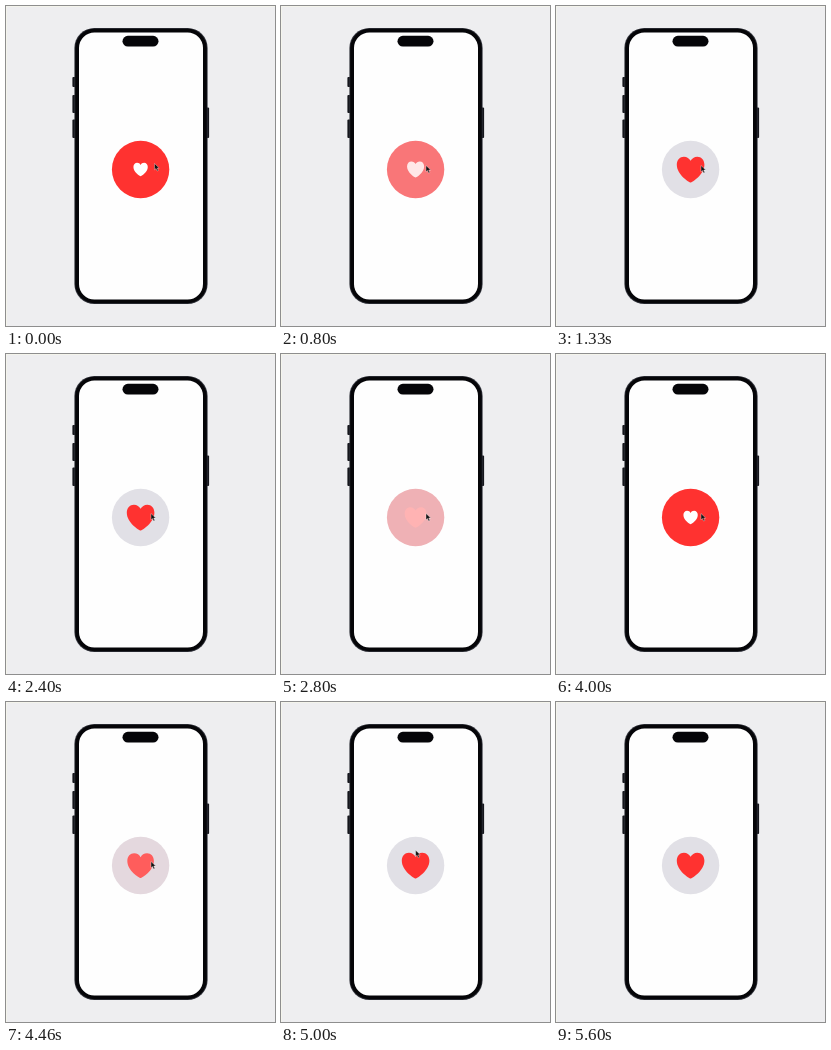
These frames come from a looping animation (269x320 px, 5.93 s). An HTML page:

```html
<!DOCTYPE html>
<html lang="en">
<head>
<meta charset="utf-8">
<title>Like button</title>
<style>
  html, body { margin: 0; width: 100%; height: 100%; overflow: hidden; background: #eeeef0; }
  svg { display: block; width: 269px; height: 320px; }
</style>
</head>
<body>
<svg viewBox="0 0 269 320">
  <rect width="269" height="320" fill="#eeeef0"/>
  <path d="M.5 320V.5H269" fill="none" stroke="#f4f4ec"/>
  <g fill="#15161c">
    <rect x="66.4" y="71" width="4" height="10" rx="1"/>
    <rect x="66.4" y="89" width="4" height="18" rx="1"/>
    <rect x="66.4" y="113.5" width="4" height="18.5" rx="1"/>
    <rect x="199.5" y="101.500" width="3.6" height="30.5" rx="1"/>
  </g>
  <rect x="68.400" y="22" width="133.2" height="276" rx="20" fill="#30323a"/>
  <rect x="69.2" y="22.8" width="131.6" height="274.4" rx="19.300" fill="#050508"/>
  <rect x="73" y="26.5" width="124" height="267" rx="15.5" fill="#fefefe"/>
  <rect x="116.5" y="29.8" width="36" height="10.8" rx="5.4" fill="#050508"/>
  <circle id="disc" cx="134.6" cy="163.500" r="28.7"/>
  <path id="heart" d="M0 13C-1.200 13 -13.8 5.200 -13.8 -4.800C-13.8 -9.600 -10.700 -12.800 -6.700 -12.800C-3.600 -12.800 -1.300 -11.100 0 -8.700C1.300 -11.100 3.600 -12.800 6.700 -12.800C10.700 -12.800 13.800 -9.600 13.800 -4.800C13.800 5.200 1.200 13 0 13Z"/>
  <path id="cursor" d="M0 0V6.300L1.500 5L2.600 7.500L3.800 7L2.700 4.600H4.700Z" fill="#111" stroke="#fff" stroke-opacity=".7" stroke-width=".5"/>
</svg>
<script>
const LOOP = 5930, FADE = 350;
const RED = [255, 50, 48], GREY = [225, 224, 230], WHITE = [255, 255, 255];
// [start, liked]
const toggles = [[690, 1], [2640, 0], [4180, 1]];
// [time, x, y] of the pointer tip
const route = [
  [0, 148.5, 157.5], [130, 148.5, 157.5], [530, 145, 159.5], [4540, 145, 159.5],
  [5130, 128, 141], [5580, 48, -9], [LOOP, 48, -9]
];
const [disc, heart, cursor] = ['disc', 'heart', 'cursor'].map(id => document.getElementById(id));

const clamp = v => Math.min(1, Math.max(0, v));
const smooth = v => v * v * (3 - 2 * v);

// cubic-bezier(.42, 0, .58, 1)
function ease(x) {
  let lo = 0, hi = 1, u = x;
  for (let i = 0; i < 20; i++) {
    u = (lo + hi) / 2;
    const bx = 1.26 * u * (1 - u) ** 2 + 1.74 * u * u * (1 - u) + u ** 3;
    if (bx < x) lo = u; else hi = u;
  }
  return smooth(u);
}

// Colours blend in linear light
const toLinear = c => (c /= 255) <= .04045 ? c / 12.92 : ((c + .055) / 1.055) ** 2.4;
const toSrgb = v => 255 * (v <= .0031308 ? v * 12.92 : 1.055 * v ** (1 / 2.4) - .055);
function mix(a, b, p) {
  const rgb = a.map((c, i) => Math.round(toSrgb(toLinear(c) * (1 - p) + toLinear(b[i]) * p)));
  return `rgb(${rgb})`;
}

function likedAt(t) {
  let p = 0;
  for (const [start, goal] of toggles) p += (goal - p) * ease(clamp((t - start) / FADE));
  return p;
}

function pointerAt(t) {
  const i = route.findIndex(k => k[0] > t);
  const [t0, x0, y0] = route[i - 1], [t1, x1, y1] = route[i];
  const raw = (t - t0) / (t1 - t0);
  const p = t0 === 4540 ? raw * raw : t0 === 5130 ? raw : smooth(raw);
  return [x0 + (x1 - x0) * p, y0 + (y1 - y0) * p];
}

function draw(t) {
  const p = likedAt(t);
  disc.setAttribute('fill', mix(RED, GREY, p));
  heart.setAttribute('fill', mix(WHITE, RED, p));
  heart.setAttribute('transform', `translate(134.6 163.5) scale(${.52 + .48 * p})`);
  cursor.setAttribute('transform', `translate(${pointerAt(t)})`);
}

const begin = performance.now();
function tick() {
  draw((performance.now() - begin) % LOOP);
  requestAnimationFrame(tick);
}
tick();
</script>
</body>
</html>
```
